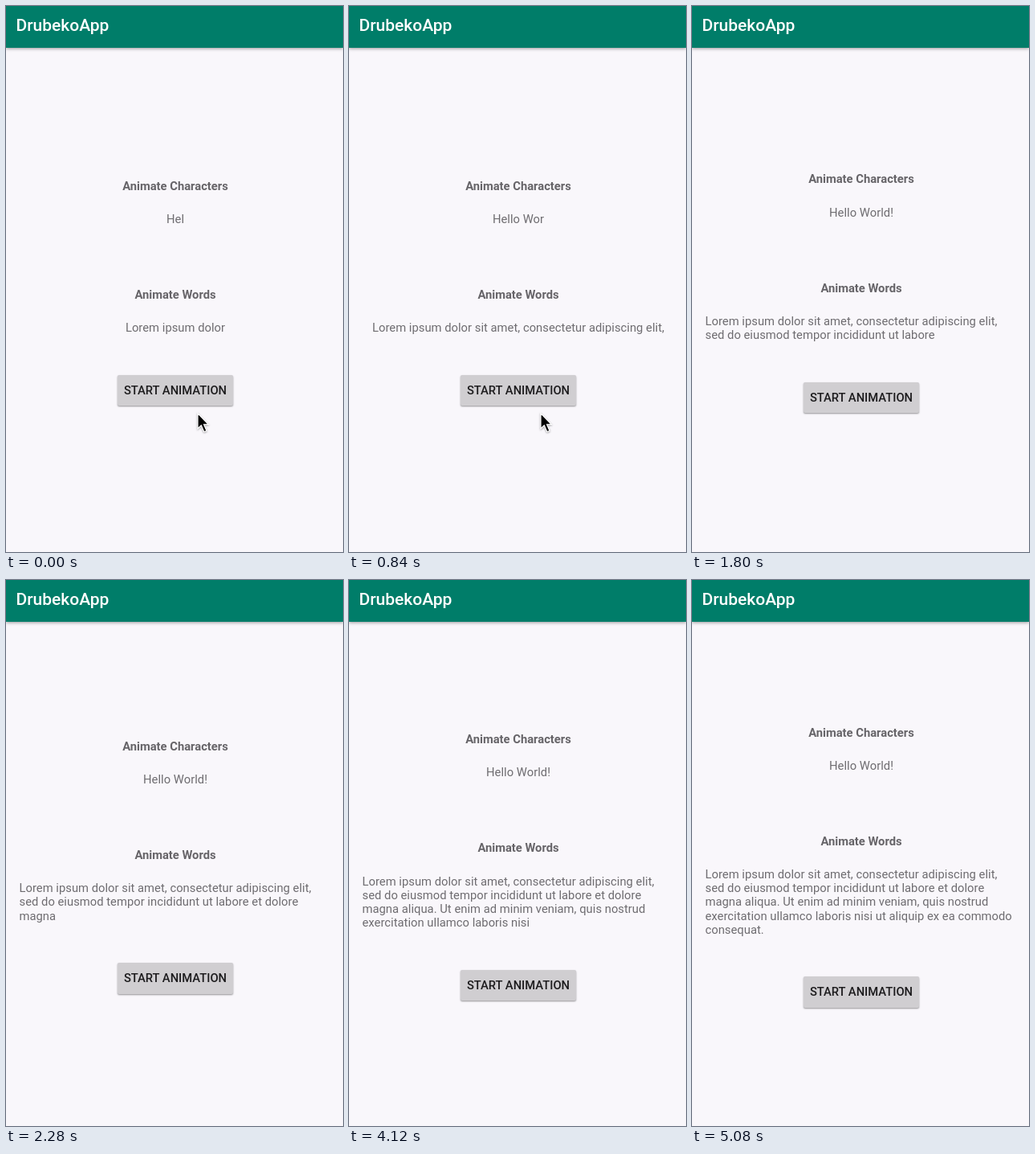
Recreate the animation shown at these times as an HTML page. Size 420 px wide and 679 px high, loop 5560 ms.

```html
<!DOCTYPE html>
<html lang="en">
<head>
<meta charset="utf-8">
<title>Typing animation</title>
<style>
  html, body { margin: 0; width: 100%; height: 100%; overflow: hidden; }
  body {
    position: relative;
    background: #f9f7fb;
    color: #6e6c70;
    font: 14.75px/17.25px Roboto, sans-serif;
  }
  header {
    position: absolute;
    inset: 0 0 auto;
    height: 52px;
    padding-left: 12.5px;
    background: #007d69;
    box-shadow: 0 1px 4px rgba(0, 0, 0, .4);
    color: #fff;
    font-size: 21px;
    font-weight: 500;
    line-height: 48px;
  }
  main {
    position: absolute;
    left: 16.5px;
    top: 0;
    width: 389px;
    height: 713.5px;
    display: flex;
    flex-direction: column;
    align-items: center;
    justify-content: center;
  }
  h2 { margin: 0 0 24px; font: inherit; font-weight: 700; color: #666468; }
  p { margin: 0; min-height: 17.25px; letter-spacing: .03px; }
  #chars { margin-bottom: 76.7px; }
  #words { margin-bottom: 49.25px; }
  .button {
    flex: none;
    width: 144px;
    height: 38.5px;
    border-radius: 2px;
    background: #d0ced1;
    box-shadow: 0 1px 2px rgba(0, 0, 0, .4);
    color: #1c1b1d;
    font-weight: 500;
    line-height: 38.5px;
    text-align: center;
    white-space: nowrap;
  }
  #cursor {
    position: absolute;
    left: 0;
    top: 0;
    overflow: visible;
    filter: drop-shadow(0 1px 1px rgba(0, 0, 0, .35));
  }
</style>
</head>
<body>
<header>DrubekoApp</header>
<main>
  <h2>Animate Characters</h2>
  <p id="chars"></p>
  <h2>Animate Words</h2>
  <p id="words"></p>
  <div class="button">START ANIMATION</div>
</main>
<svg id="cursor" width="1" height="1">
  <path d="M239 506.5V525.5L243.3 521.5L246.8 529.5L250 528.2L246.6 520.3H252.2Z"
        stroke="#fff" stroke-width="1.2"/>
</svg>
<script>
const LOOP = 5560, TICK = 40, TYPED_AT_START = 3;
const GREETING = "Hello World!";
const WORDS = ("Lorem ipsum dolor sit amet, consectetur adipiscing elit, " +
  "sed do eiusmod tempor incididunt ut labore et dolore magna aliqua. " +
  "Ut enim ad minim veniam, quis nostrud exercitation ullamco laboris nisi " +
  "ut aliquip ex ea commodo consequat.").split(" ");

// Moments at which the next character or word appears, in ms
const CHAR_TIMES = [80, 240, 400, 560, 720, 840, 1000, 1160, 1320];
const WORD_TIMES = [
  120, 280, 440, 600, 720, 880, 1040, 1200, 1360, 1480, 1640,
  1800, 1960, 2120, 2280, 2400, 2560, 2720, 2880, 3040, 3160, 3320,
  3480, 3600, 3800, 3960, 4120, 4240, 4400, 4560, 4680, 4840, 5000
];
const CURSOR_LEAVES = 1400, CURSOR_GONE = 1600;

const [chars, words, cursor] =
  ["chars", "words", "cursor"].map(id => document.getElementById(id));

const typedBy = (times, t) =>
  TYPED_AT_START + times.filter(time => time <= t).length;

function setText(element, text) {
  if (element.textContent !== text) element.textContent = text;
}

function draw(now) {
  const t = Math.floor(now % LOOP / TICK) * TICK;
  setText(chars, GREETING.slice(0, typedBy(CHAR_TIMES, t)));
  setText(words, WORDS.slice(0, typedBy(WORD_TIMES, t)).join(" "));

  const exit = Math.max(0, (t - CURSOR_LEAVES) / (CURSOR_GONE - TICK - CURSOR_LEAVES));
  cursor.style.transform = `translateX(${150 * exit * exit}px)`;
  cursor.style.visibility = t < CURSOR_GONE ? "visible" : "hidden";
}

const start = performance.now();
function frame() {
  draw(performance.now() - start);
  requestAnimationFrame(frame);
}
frame();
</script>
</body>
</html>
```
